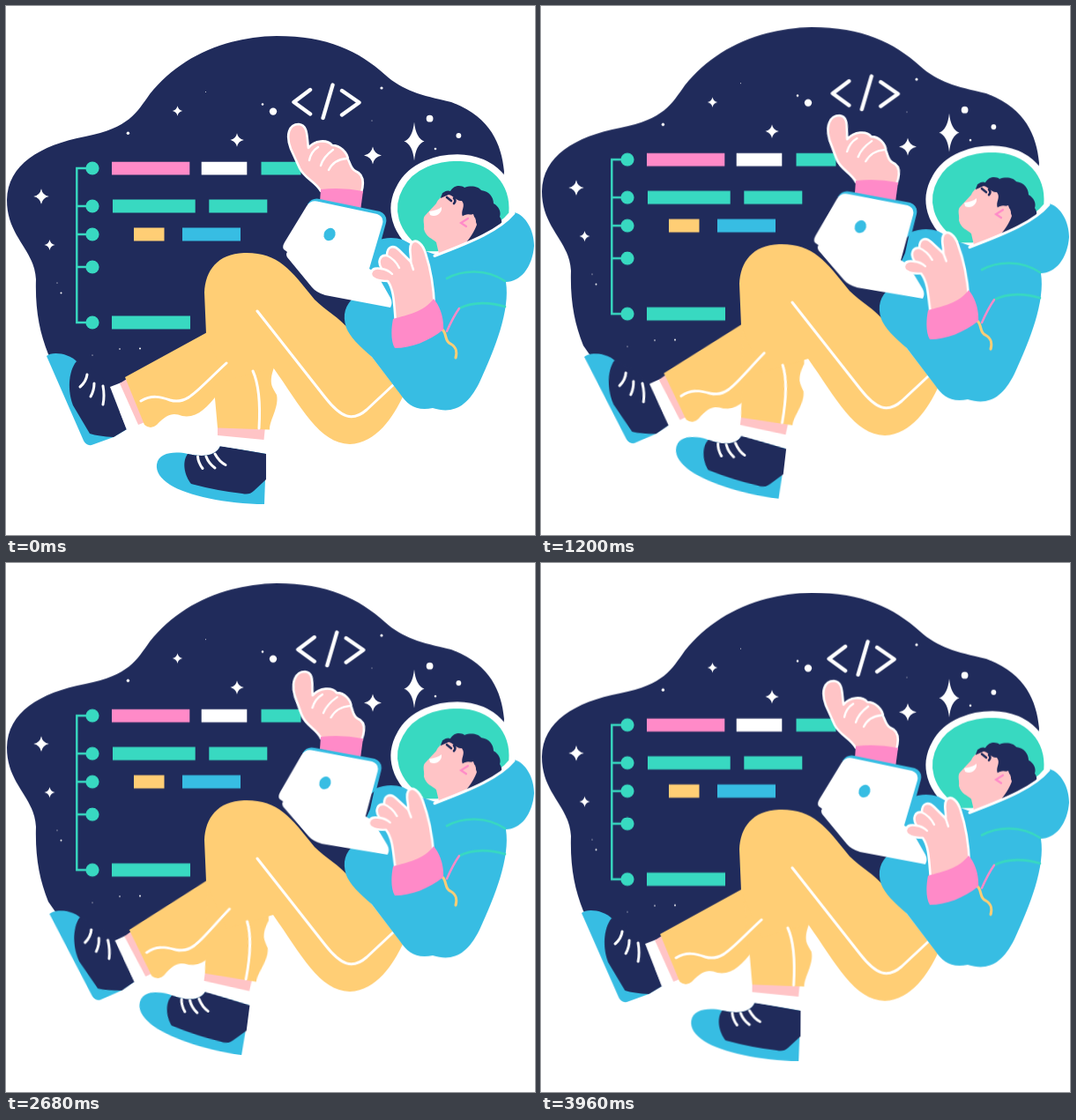
These frames come from a looping animation (600 px wide and 600 px high, 4 s). An HTML page without scripts:

```html
<!DOCTYPE html>
<html lang="en">
<head>
<meta charset="utf-8">
<title>Floating coder</title>
<style>
  html, body { margin: 0; width: 100%; height: 100%; overflow: hidden; background: #fff; }
  svg { display: block; width: 100vw; height: 100vh; }

  .navy { fill: #202b5b; }
  .blue { fill: #37bde3; }
  .teal { fill: #38d9c1; }
  .pink { fill: #ff8ac8; }
  .gold { fill: #ffce75; }
  .skin { fill: #ffc4c6; }
  .white { fill: #fff; }
  .line { fill: none; stroke: #fff; stroke-width: 3; stroke-linecap: round; stroke-linejoin: round; }
  .thin { stroke-width: 2.4; }
  .edge { stroke: #fff; stroke-width: 2.6; stroke-linejoin: round; }

  /* Every part drifts one way for 2 s, then back */
  .move { animation: 2s linear infinite alternate; }
  .float { animation-name: float; }
  .icon { animation-name: icon; }
  .point { animation-name: point; transform-origin: 380px 215px; }
  .laptop { animation-name: laptop; transform-origin: 420px 340px; }
  .hand { animation-name: hand; transform-origin: 467px 362px; }
  .back-leg { animation-name: back-leg; transform-origin: 226px 352px; }
  .front-leg { animation-name: front-leg; transform-origin: 250px 365px; }
  @keyframes float { to { transform: translateY(-16.4px); } }
  @keyframes icon { to { transform: translateX(7.2px); } }
  @keyframes point { to { transform: skewX(-7.6deg); } }
  @keyframes laptop { to { transform: translateX(-5px) rotate(-2deg); } }
  @keyframes hand { to { transform: rotate(-3.5deg); } }
  @keyframes back-leg { to { transform: rotate(-5.8deg); } }
  @keyframes front-leg { to { transform: rotate(11.1deg); } }
</style>
</head>
<body>
<svg viewBox="0 0 600 600">
  <defs>
    <path id="star" d="M0-10Q1.6-1.6 10 0Q1.6 1.6 0 10Q-1.6 1.6-10 0Q-1.6-1.6 0-10Z"/>
    <circle id="node" cx="98" r="7.6"/>
  </defs>
  <g class="move float">
    <path class="navy" d="M565 188C562 155 548 125 505 109C470 101 450 96 430 78C400 51 365 34 307 34C245 35 195 60 163 100C148 121 140 138 90 148C38 158 2 180 1 220C1 262 32 275 34 310C33 345 38 370 48 395L90 455L125 462L150 455L215 438L245 402L300 396L390 392L500 300L560 230Z"/>

    <!-- Stars -->
    <g class="white">
      <use href="#star" transform="translate(194.5 119) scale(.57)"/>
      <use href="#star" transform="translate(262 152) scale(.78)"/>
      <use href="#star" transform="translate(40 216) scale(.88)"/>
      <use href="#star" transform="translate(49.5 271) scale(.6)"/>
      <use href="#star" transform="translate(416 169.5) scale(1)"/>
      <use href="#star" transform="translate(463 153.5) scale(1.15 2.2)"/>
      <circle cx="303" cy="119.6" r="4.2"/>
      <circle cx="291" cy="111.5" r="1.3"/>
      <circle cx="138.4" cy="144.3" r="1.7"/>
      <circle cx="426" cy="93" r="1.6"/>
      <circle cx="480.6" cy="127.7" r="3.9"/>
      <circle cx="513.4" cy="147" r="2.9"/>
      <circle cx="487" cy="162" r="1.3"/>
      <circle cx="415" cy="130" r=".5"/>
      <circle cx="226.5" cy="97.5" r=".5"/>
      <circle cx="58" cy="314" r=".6"/>
      <circle cx="62.5" cy="325.5" r="1"/>
      <circle cx="98" cy="396" r=".6"/>
      <circle cx="129" cy="389" r=".8"/>
      <circle cx="152" cy="388.5" r="1"/>
    </g>

    <!-- Code tree -->
    <path d="M98 184H80.3V359H98M80.3 227H98M80.3 259H98M80.3 296H98" fill="none" stroke="#38d9c1" stroke-width="2.4"/>
    <g class="teal">
      <use href="#node" y="184"/>
      <use href="#node" y="227"/>
      <use href="#node" y="259"/>
      <use href="#node" y="296"/>
      <use href="#node" y="359"/>
      <path d="M289.5 176.7h45v14.8h-45zM121 219.5h93.7v15H121zM230.3 219.5h66v15h-66zM120 351.5h89v15h-89z"/>
    </g>
    <path class="pink" d="M120 176.7h88.3v14.8H120z"/>
    <path class="white" d="M221.7 176.7h51.6v14.8h-51.6z"/>
    <path class="gold" d="M145 251.5h34.5v15H145z"/>
    <path class="blue" d="M200 251.5h66v15h-66z"/>
    <path class="line move icon" style="stroke-width:4.4" d="M345 95L326.5 109L345 122.5M370.5 89.5L359.5 127M381 96L400.5 109.5L381 123.5"/>

    <!-- Back leg -->
    <g class="move back-leg">
      <path class="blue" d="M46 397C52 391 72 394 80 403L137 480L122 489L97 498Q91 499 88 493Z"/>
      <path class="navy" d="M80 403C92 408 110 420 118 432L137 480L122 489Q105 488 95 485L76 453C70 438 70 415 80 403Z"/>
      <path class="line" d="M92 418Q91 426 84 432M100 428Q100 436 96 443M110 431Q112 442 110 452"/>
      <path class="white" d="M118 432L131 427L151 473L137 481Z"/>
      <path class="skin" d="M129 428L137 423L160 471L150 475Z"/>
      <path class="gold" d="M232 368L135 421L157 475Q164 481 171 475C183 462 190 461 200 465C216 468 228 456 240 440L285 405L250 345Z"/>
    </g>

    <!-- Front leg -->
    <g class="move front-leg">
      <path class="blue" d="M171 520C173 506 192 505 206 508C225 512 238 510 243 499L295 508L293 565C250 565 205 555 186 543C175 536 170 528 171 520Z"/>
      <path class="navy" d="M206 508C225 512 238 510 243 499L295 508V537L281 550Q276 555 268 553Q240 550 210 542C203 533 199 518 206 508Z"/>
      <path class="line" d="M217.5 511Q218 518 223 524.500M227 511Q230 519 237 524M237 508Q242 517 249 520.500"/>
      <path class="white" d="M240 486L293 490L295 507L241 499Z"/>
      <path class="skin" d="M240 477H294L292.500 492L240 487Z"/>
      <path class="gold" d="M228 362C232 400 237 440 240 478.500L299 480.500C299 469 310 455 307 441C303 433 297 429 304 410L300 375L260 345Z"/>
    </g>
    <path class="gold" d="M390 368C378 353 362 345 350 333C322 298 308 279 270 280C240 281 226 300 225 325L227 372L250 425L303 410C335 455 355 496 390 497C420 496 440 465 450 443L415 398Z"/>
    <path class="line move back-leg" d="M153 448C165 441 175 443 186 447C206 453 216 436 250 405"/>
    <path class="line move front-leg" d="M280 414C286 427 289 445 287 479"/>
    <path class="line" d="M285 346L362 444C380 467 393 472 409 458L439 430"/>

    <!-- Helmet and head -->
    <path class="teal" stroke="#fff" stroke-width="7.500" d="M474 282C438 258 434 228 447 205C460 180 490 172 512 172C553 173 577 200 574 236C560 254 530 267 490 282Z"/>
    <path class="skin" d="M502 211C494 216 490 219 488 224L475 238C472 242 475 248 474 253C476 262 484 264 488 268L491 281L545 258L530 215Z"/>
    <path class="navy" d="M493 218C494 211 500 208 504 210C508 203 516 203 520 206C528 203 536 205 539 209C548 210 553 217 553 224C559 227 562 234 560 239C564 244 562 250 558 254L520 271C527 262 531 256 534 248L530 236L518 239C515 232 522 227 517 221C511 222 508 215 502 214Z"/>
    <path class="skin" d="M517 239C524 233 534 237 533 246C532 255 521 260 515 253Z"/>
    <path d="M524 241L516 246L522 250" fill="none" stroke="#ff8ac8" stroke-width="2.200" stroke-linecap="round"/>
    <path d="M500 217L505 221M508 218Q511 221 508 224M496 213L506 211" fill="none" stroke="#202b5b" stroke-width="2.600" stroke-linecap="round"/>
    <path class="white" d="M480 233C486 232 490 231 494 228C495 235 488 240 481 237Z"/>

    <!-- Jacket -->
    <path class="blue" d="M577 234C590 238 599 255 599 272C597 297 583 313 567 313C572 345 555 388 537 427C523 455 507 463 484 456C465 460 455 452 447 440L415 398C400 385 390 375 386 365C381 350 385 339 395 330L413 290L418 267C430 262 440 262 450 265L470 276L490 283C530 267 560 254 577 234Z"/>
    <path class="line" d="M486 283.500C530 267 560 254 576 235"/>
    <path d="M500 309C518 299 545 298 566 312M514 343C530 335 550 336 566 341" fill="none" stroke="#38d9c1" stroke-width="2.600" stroke-linecap="round"/>
    <path d="M514 343Q507 353 500 369" fill="none" stroke="#ff8ac8" stroke-width="2.400" stroke-linecap="round"/>
    <path d="M490 364C502 368 496 380 504 383C511 387 512 392 510 399" fill="none" stroke="#ffce75" stroke-width="3" stroke-linecap="round"/>

    <!-- Pointing hand -->
    <g class="move point">
      <path class="skin edge" d="M323 162C317 146 321 134 332 134C343 135 341 149 343 161C350 152 364 151 370 158C379 158 387 166 388 174C391 180 391 184 396 187C404 190 407 198 403 212L357 210C351 199 339 196 333 184Z"/>
      <path class="line thin" d="M344 175Q346 165 354 160M357 181Q360 171 371 163M366 186Q372 174 386 173"/>
    </g>
    <path class="pink" d="M357 208Q380 205 405 210L402 232L356 222Z"/>

    <!-- Laptop -->
    <g class="move laptop">
      <path class="blue" d="M342 225Q347 217 356 219L424 233Q433 237 431 246L425 268L410 280Z"/>
      <path class="white" d="M341 227Q346 219 355 222L421 236Q429 239 427 247L412 298L420 303L436 331Q439 337 436 342L362 328Q352 325 347 319L319 285Q317 281 319 279L315 276Q313 273 316 268Z"/>
      <ellipse class="blue" cx="367" cy="259" rx="6.300" ry="7.500" transform="rotate(30 367 259)"/>
    </g>

    <!-- Typing hand -->
    <g class="move hand">
      <path class="skin edge" d="M442 360C440 335 440 322 433 312C424 312 413 310 414 303C415 297 421 297 426 298C421 290 424 282 432 283C432 273 439 270 446 277L459 290C460 282 456 275 460 269C465 263 473 270 476 281C481 296 485 315 486 342Z"/>
      <path class="line thin" d="M426 298Q433 299 438 304M432 283Q441 287 446 297M459 290L462 299"/>
    </g>
    <path class="pink" d="M439 355C456 350 474 347 485 332C492 340 497 354 496 367C480 380 460 388 441 388C436 380 437 365 439 355Z"/>
  </g>
</svg>
</body>
</html>
```
